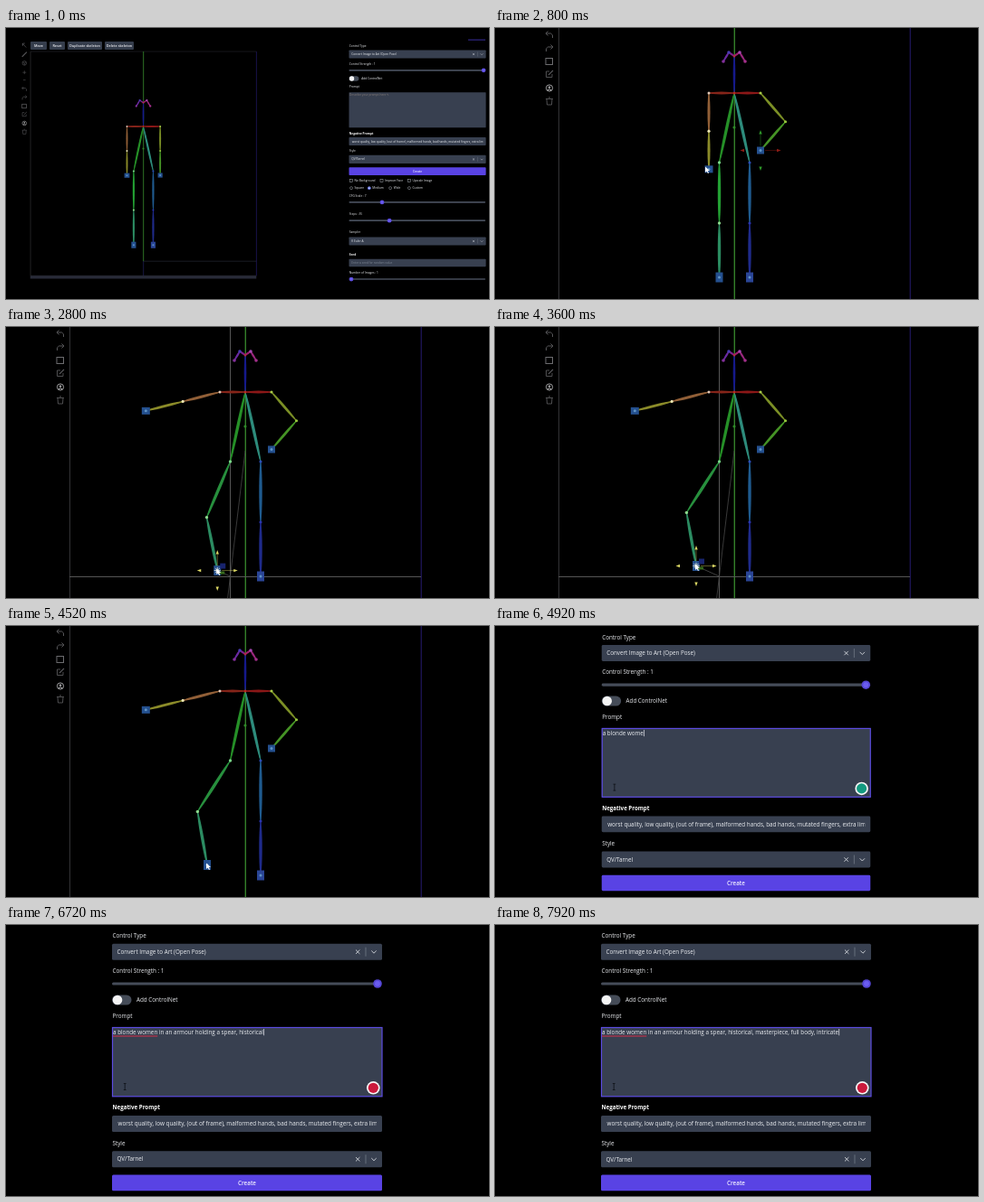
Recreate the animation shown at these times as an HTML page with a canvas. Size 533 px wide and 300 px high, loop 8000 ms.

```html
<!DOCTYPE html>
<html lang="en">
<head>
<meta charset="utf-8">
<title>Pose editor</title>
<style>
html, body { margin: 0; width: 100%; height: 100%; overflow: hidden; background: #000; }
canvas { display: block; width: 533px; height: 300px; }
</style>
</head>
<body>
<canvas id="stage"></canvas>
<script>
const W = 533, H = 300, LOOP = 8000, CUT = 4600;
const canvas = document.getElementById('stage');
const c = canvas.getContext('2d');
const dpr = Math.max(1, window.devicePixelRatio || 1);
canvas.width = W * dpr;
canvas.height = H * dpr;

const FIELD = '#384050', INDIGO = '#5943e4', TRACK = '#454c59';
const PROMPT = 'a blonde women in an armour holding a spear, historical, masterpiece, full body, intricate';
const NEGATIVE = 'worst quality, low quality, (out of frame), malformed hands, bad hands, mutated fingers, extra limbs, blurry';

// Page space holds two close-up spaces: the pose canvas and the form.
const POSE = { s: 1 / 1.555, x: 151.5 - 264 / 1.555, y: 109 - 72 / 1.555 };
const FORM = { s: 0.507, x: 378.5 - 117 * 0.507, y: 20 - 12 * 0.507 };
const invert = m => ({ s: 1 / m.s, x: -m.x / m.s, y: -m.y / m.s });
const apply = m => { c.translate(m.x, m.y); c.scale(m.s, m.s); };

const clamp = v => Math.max(0, Math.min(1, v));
const lerp = (a, b, k) => a + (b - a) * k;
const mix = (p, q, k) => [lerp(p[0], q[0], k), lerp(p[1], q[1], k)];
const span = (t, a, b) => { const k = clamp((t - a) / (b - a)); return k * k * (3 - 2 * k); };
const during = (t, a, b) => t >= a && t < b;

function line(color, width, ...pts) {
  c.strokeStyle = color;
  c.lineWidth = width;
  c.beginPath();
  pts.forEach(p => c.lineTo(p[0], p[1]));
  c.stroke();
}
function dot(x, y, r, color) {
  c.fillStyle = color;
  c.beginPath();
  c.arc(x, y, r, 0, 7);
  c.fill();
}
function ring(x, y, r, color, width = 1) {
  c.strokeStyle = color;
  c.lineWidth = width;
  c.beginPath();
  c.arc(x, y, r, 0, 7);
  c.stroke();
}
function box(x, y, w, h, color, r = 1.5) {
  c.fillStyle = color;
  c.beginPath();
  c.roundRect(x, y, w, h, r);
  c.fill();
}
function text(str, x, y, size = 6.3, color = '#eceef2', weight = 400, align = 'left') {
  c.font = `${weight} ${size}px "Open Sans", "Noto Sans", sans-serif`;
  c.fillStyle = color;
  c.textAlign = align;
  c.textBaseline = 'alphabetic';
  c.fillText(str, x, y + size * 0.35);
}

// ---- pose canvas ----
const NECK = [264, 72], L_SH = [236, 72], R_SH = [293, 72], L_HIP = [247.5, 149], R_HIP = [281, 149];
const REACH = 84.3;

function elbow(a, w, l1, l2, side) {
  const dx = w[0] - a[0], dy = w[1] - a[1];
  const d = Math.min(Math.hypot(dx, dy), l1 + l2);
  const bend = Math.acos(clamp((l1 * l1 + d * d - l2 * l2) / (2 * l1 * d)));
  const ang = Math.atan2(dy, dx) + side * bend;
  return [a[0] + l1 * Math.cos(ang), a[1] + l1 * Math.sin(ang)];
}

function pose(t) {
  const swing = lerp(Math.PI / 2, Math.PI - 0.25, span(t, 950, 1760));
  const lw = [L_SH[0] + REACH * Math.cos(swing), L_SH[1] + REACH * Math.sin(swing)];
  const rw = mix([293, 156], [293, 135.5], span(t, 220, 680));
  const lf = mix([247.5, 276], [222, 264.5], span(t, 1960, 3520));
  return {
    lw, rw, lf,
    le: mix(L_SH, lw, 0.5),
    re: elbow(R_SH, rw, 42, 42, -1),
    lk: elbow(L_HIP, lf, 67, 60, 1)
  };
}

function bone(a, b, color, w = 1.7) {
  const dx = b[0] - a[0], dy = b[1] - a[1];
  c.fillStyle = color;
  c.beginPath();
  c.ellipse((a[0] + b[0]) / 2, (a[1] + b[1]) / 2, Math.hypot(dx, dy) / 2, w, Math.atan2(dy, dx), 0, 7);
  c.fill();
  line(color, 1, a, b);
}
function grip(p, w, h, color = '#24508f') {
  box(p[0] - w / 2, p[1] - h / 2, w, h, color, 0);
  dot(p[0], p[1], 1.5, '#5f93c4');
}

function head(x, y, dx, dy, color) {
  c.fillStyle = color;
  c.beginPath();
  c.moveTo(x + dx * 4.5, y + dy * 4.5);
  c.lineTo(x - dy * 1.7, y + dx * 1.7);
  c.lineTo(x + dy * 1.7, y - dx * 1.7);
  c.fill();
}
function gizmo(p, xCol, yCol, active) {
  const [x, y] = p;
  if (active) {
    box(x + 3, y - 8, 6, 6, '#18246e', 0);
    box(x + 2, y + 1, 6, 3, '#356a1c', 0);
  }
  c.globalAlpha = 0.6;
  line(xCol, 0.7, [x + 5, y], [x + 19, y]);
  line(yCol, 0.7, [x, y - 18], [x, y - 5]);
  c.globalAlpha = 1;
  head(x + 18, y, 1, 0, xCol);
  head(x - 18, y, -1, 0, xCol);
  head(x, y - 18, 0, -1, yCol);
  head(x, y + 18, 0, 1, yCol);
  if (active) {
    for (let i = 0; i < 4; i++) {
      const a = i * Math.PI / 4, u = Math.cos(a) * 3.6, v = Math.sin(a) * 3.6;
      line('#f0f0dc', 0.8, [x - u, y - v], [x + u, y + v]);
    }
  }
}
function guides(p, now) {
  c.save();
  c.beginPath();
  c.rect(70, -57, 388, 386);
  c.clip();
  const [x, y] = p;
  line('#585858', 1, [70, y + 0.5], [458, y + 0.5]);
  line('#585858', 1, [x, -57], [x, 329]);
  line('#484848', 0.8, [264, 137], mix([264, 137], p, 6));
  line('#505050', 0.8, p, now);
  c.restore();
}
function pointer(x, y) {
  c.fillStyle = '#fff';
  c.beginPath();
  [[0, 0], [0, 6.5], [1.6, 5], [3, 7.5], [4, 7], [2.8, 4.6], [5, 4.4]].forEach(p => c.lineTo(x + p[0], y + p[1]));
  c.fill();
}

function skeleton(t) {
  const p = pose(t);
  line('#343437', 1, [70.5, -57], [70.5, 329], [458, 329]);
  line('#25252b', 1, [70.5, -57], [458, -57]);
  line('#281d74', 1, [458.2, -57], [458.2, 329]);
  box(70, 329, 388, 5, '#282b38', 0);
  line('#343848', 0.8, [264, 304], [458, 304]);
  line('#26266a', 1, [264.3, 304], [264.3, 329]);
  line('#35802a', 1.4, [264.3, -57], [264.3, 304]);

  if (during(t, 220, 690)) guides([293, 156], p.rw);
  if (during(t, 950, 1780)) guides([236, 156], p.lw);
  if (during(t, 1900, 3960)) guides([247.5, 276], p.lf);

  bone(NECK, [264, 30], '#161a8c', 1.3);
  bone([264, 31], [258, 27], '#7a1f8c', 1.1);
  bone([264, 31], [270, 27], '#9c1f70', 1.1);
  bone([258, 27], [252, 37], '#6a2aa0', 1.2);
  bone([270, 27], [276, 37], '#98287c', 1.2);
  dot(258, 27, 1.8, '#4a3cb4');
  dot(270, 27, 1.8, '#a848b4');
  dot(252, 37, 1.8, '#84309c');
  dot(276, 37, 1.8, '#a4308c');
  dot(264, 31, 1.5, '#b02848');
  bone(NECK, L_SH, '#86241a', 1.5);
  bone(NECK, R_SH, '#8c1818', 1.5);
  bone(L_SH, p.le, '#926038', 1.5);
  bone(p.le, p.lw, '#8c8c2a', 1.5);
  bone(R_SH, p.re, '#7c9026', 1.5);
  bone(p.re, p.rw, '#469426', 1.5);
  bone(NECK, L_HIP, '#269028');
  bone(NECK, R_HIP, '#2e8c7c');
  const bent = span(t, 1960, 2600);
  bone(L_HIP, p.lk, bent > 0.5 ? '#28903e' : '#24a034');
  bone(p.lk, p.lf, '#2c8c62');
  bone(R_HIP, [281, 216], '#205c90');
  bone([281, 216], [281, 276], '#202c8c');
  grip(p.lw, 9, 8);
  grip(p.rw, 8, 8);
  grip(p.lf, 8, 11);
  grip([281, 276], 8, 11, '#2a4596');
  dot(264, 72, 1.5, '#b8281e');
  dot(264, 110, 1.6, '#2f8a28');
  dot(...L_SH, 1.5, '#e0c8b8');
  dot(...p.le, 1.6, '#ece6b4');
  dot(...R_SH, 1.6, '#a8cc48');
  dot(...p.re, 1.6, '#94c83c');
  dot(...L_HIP, 1.7, '#78d488');
  dot(...p.lk, 1.7, '#8cd88c');
  dot(...R_HIP, 1.6, '#2c4cb8');
  dot(281, 216, 1.6, '#2a34b0');

  if (during(t, 120, 900)) gizmo(p.rw, '#8f1c16', '#2f9a2a', false);
  if (during(t, 900, 1800)) gizmo(p.lw, '#dcd864', '#dcd864', true);
  if (during(t, 1800, 3960)) gizmo(p.lf, '#dcd864', '#dcd864', true);

  if (during(t, 690, 950)) pointer(...mix([293, 135], [232, 153.5], span(t, 690, 800)));
  else if (during(t, 950, 1780)) pointer(p.lw[0] - 3, p.lw[1] - 1);
  else if (during(t, 1780, CUT)) pointer(p.lf[0] - 1, p.lf[1] - 2);
}

// Icons sit in a column, drawn around (0,0).
const GREY = '#58585b', LIT = '#b0b0b2';
const undo = () => {
  line(GREY, 1, [-1.5, -4], [-4, -1.5], [-1.5, 1]);
  line(GREY, 1, [-4, -1.5], [1.5, -1.5], [3.5, 0.3], [3.5, 3.5]);
};
const edit = () => {
  line(GREY, 0.9, [0, -3], [-3.5, -3], [-3.5, 3.5], [3, 3.5], [3, 0]);
  line(GREY, 1.1, [-1, 1], [4, -4]);
};
const ICONS = [
  [-68, () => line(GREY, 1, [3, 4], [-3, -3], [-3, 1], [-3, -3], [1, -3])],
  [-52, () => line(GREY, 1.8, [-4, 4], [4, -4])],
  [-37, () => { ring(0, 0, 3.5, GREY); line(GREY, 0.9, [-3, -2], [0, 0], [3, -2]); line(GREY, 0.9, [0, 0], [0, 3.5]); }],
  [-21, () => { line(GREY, 0.9, [-3, 0], [3, 0]); line(GREY, 0.9, [0, -3], [0, 3]); }],
  [-8, () => line(GREY, 0.9, [-2, 0], [2, 0])],
  [7.5, undo],
  [22.5, () => { c.scale(-1, 1); undo(); }],
  [37, () => { c.strokeStyle = '#6c6c6f'; c.lineWidth = 1; c.strokeRect(-4, -3.5, 7.5, 7); }],
  [51, edit],
  [66.5, () => { ring(0, 0, 3.6, LIT, 0.9); dot(0, -0.9, 1.2, LIT); line(LIT, 1, [-2, 2.3], [0, 1.2], [2, 2.3]); }],
  [81, () => { line(GREY, 0.9, [-4, -2.5], [4, -2.5]); line(GREY, 0.9, [-3, -2.5], [-2.5, 4], [2.5, 4], [3, -2.5]); line(GREY, 0.9, [-1, -4], [1, -4]); }]
];
function sidebar() {
  for (const [y, draw] of ICONS) {
    c.save();
    c.translate(60, y);
    draw();
    c.restore();
  }
}
function toolbar() {
  [['Move', 27, 18], ['Reset', 48, 17], ['Duplicate skeleton', 68, 38], ['Delete skeleton', 109, 32]].forEach(([s, x, w]) => {
    box(x, 15, w, 9, '#353d4c', 1);
    text(s, x + w / 2, 19.5, 3.8, '#f0f0f4', 600, 'center');
  });
}

// ---- form ----
function select(str, y) {
  box(117, y - 9, 298, 18, FIELD);
  text(str, 122.5, y);
  line('#d5d8de', 0.9, [386, y - 2.2], [390.4, y + 2.2]);
  line('#d5d8de', 0.9, [390.4, y - 2.2], [386, y + 2.2]);
  line('#727a88', 0.8, [397, y - 5], [397, y + 5]);
  line('#d5d8de', 0.9, [403.3, y - 1.2], [406, y + 1.5], [408.7, y - 1.2]);
}
function slider(y, x) {
  box(117, y - 1.6, 297, 3.2, TRACK);
  dot(x, y, 4.8, '#5546d4');
  dot(x, y, 3, '#6a5cf0');
}
function typed(t) {
  const keys = [[CUT, 5], [4920, 13], [6720, 55], [7920, 90]];
  for (let i = 1; i < keys.length; i++) {
    const [a, n] = keys[i - 1], [b, m] = keys[i];
    if (t <= b) return Math.floor(lerp(n, m, clamp((t - a) / (b - a))) + 0.001);
  }
  return PROMPT.length;
}

function form(t) {
  const live = t >= CUT;
  text('Control Type', 117.5, 12);
  select('Convert Image to Art (Open Pose)', 29.7);
  text('Control Strength : 1', 117.5, 51);
  slider(65, 410);
  box(117, 77.5, 21.5, 11, '#454c58', 5.5);
  dot(123, 83, 5.3, '#f4f4f4');
  text('Add ControlNet', 144, 83);
  text('Prompt', 117.5, 101);

  box(117, 113, 298, 77, FIELD, 1);
  if (live) {
    c.strokeStyle = '#5b4be0';
    c.lineWidth = 1.2;
    c.strokeRect(117.5, 113.5, 297.5, 76.3);
    const str = PROMPT.slice(0, typed(t));
    text(str, 118, 118.6);
    const end = 118 + c.measureText(str).width;
    line('#e8e8ee', 0.7, [end + 0.6, 115], [end + 0.6, 122.3]);
    const flagged = t > 5800;
    if (flagged) {
      const w = c.measureText('a blonde women').width;
      line('#d8304c', 1.2, [118, 123], [118 + w, 123]);
    }
    dot(405.3, 180.3, 7.3, '#f6f6f6');
    dot(405.3, 180.3, 5.6, flagged ? '#cb1a3c' : '#149a80');
    line('#0d1016', 0.8, [131.2, 175.5], [131.2, 182.5]);
    line('#0d1016', 0.8, [129.8, 175.5], [132.6, 175.5]);
    line('#0d1016', 0.8, [129.8, 182.5], [132.6, 182.5]);
  } else {
    text('Describe your prompt here ✎', 118, 118, 6.3, '#857b78');
  }

  text('Negative Prompt', 117.5, 202.3, 6.2, '#fff', 700);
  box(117, 211, 298, 18, FIELD);
  c.save();
  c.beginPath();
  c.rect(123, 211, 286, 18);
  c.clip();
  text(NEGATIVE, 123.5, 220, 6.35);
  c.restore();
  text('Style', 117.5, 241.5);
  select('QV/Tarnel', 259.3);
  box(117, 276.6, 298, 17.6, INDIGO, 1.5);
  text('Create', 266, 285.5, 6.3, '#f2f0ff', 600, 'center');

  [['No Background', 122], ['Improve Face', 188], ['Upscale Image', 248]].forEach(([s, x]) => {
    c.strokeStyle = '#a8acb4';
    c.lineWidth = 1;
    c.strokeRect(x - 3, 303, 6, 6);
    text(s, x + 7, 306);
  });
  ['Square', 'Medium', 'Wide', 'Custom'].forEach((s, i) => {
    const x = [122, 161, 207, 248][i];
    ring(x, 322, 3, '#a8acb4');
    if (i === 1) { dot(x, 322, 3.4, '#5b6cf0'); dot(x, 322, 1.4, '#fff'); }
    text(s, x + 7, 322);
  });
  text('CFG Scale : 7', 117.5, 339);
  slider(353, 189);
  text('Steps : 35', 117.5, 379);
  slider(393, 205);
  text('Sampler', 117.5, 418);
  select('K Euler A', 438);
  text('Seed', 117.5, 468, 6.2, '#fff', 700);
  box(117, 477, 298, 17, FIELD);
  text('Enter a seed for random value', 122.5, 485.5, 6.3, '#7e8694');
  text('Number of Images : 1', 117.5, 507);
  slider(521, 122);
}

function view(t) {
  if (t >= CUT) {
    const f = invert(FORM), k = 1 - 0.012 * Math.exp(-(t - CUT) / 360);
    return { s: f.s * k, x: 266 + (f.x - 266) * k, y: 100 + (f.y - 100) * k };
  }
  const z = invert(POSE), k = span(t, 60, 560);
  return { s: lerp(1, z.s, k), x: z.x * k, y: z.y * k };
}

function within(space, draw, t) {
  c.save();
  apply(space);
  draw(t);
  c.restore();
}

function render(t) {
  c.setTransform(dpr, 0, 0, dpr, 0, 0);
  c.fillStyle = '#000';
  c.fillRect(0, 0, W, H);
  apply(view(t));
  if (t < CUT) {
    toolbar();
    within(POSE, sidebar, t);
    within(POSE, skeleton, t);
    box(510, 12.6, 19, 1, '#3a2fa0', 0);
  }
  within(FORM, form, t);
}

const start = performance.now();
function tick() {
  render((performance.now() - start) % LOOP);
  requestAnimationFrame(tick);
}
tick();
</script>
</body>
</html>
```
